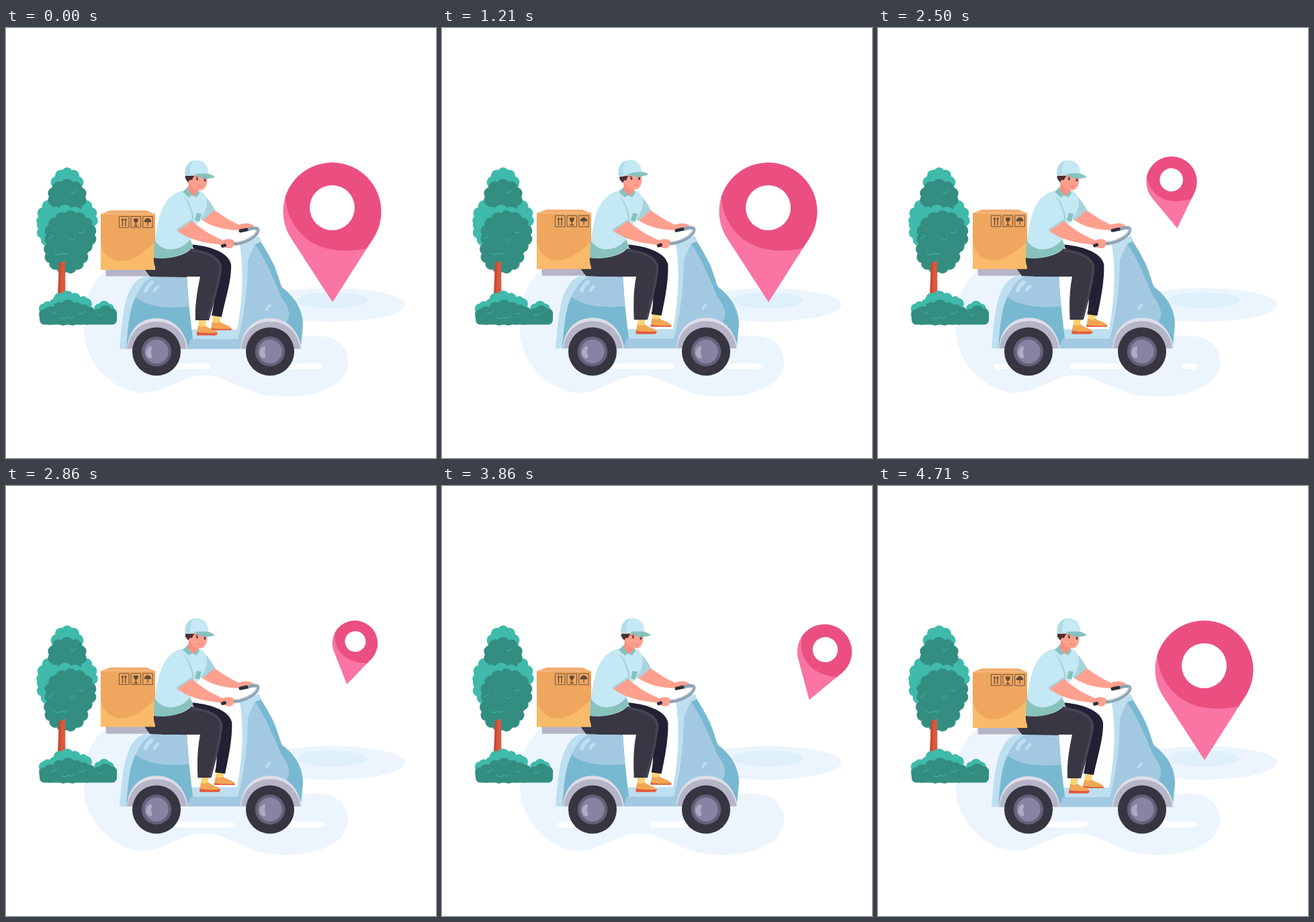
An HTML page that plays this animation: 640 by 640 pixels, repeating every 4.78 s.

```html
<!DOCTYPE html>
<html lang="en">
<head>
<meta charset="utf-8">
<title>Scooter delivery</title>
<style>
  html, body { margin: 0; width: 100%; height: 100%; overflow: hidden; background: #fff; }
  svg { display: block; width: 100%; height: 100%; }
  .road { animation: road 4780ms linear infinite; }
  @keyframes road { from { stroke-dashoffset: 127.5; } to { stroke-dashoffset: 628.5; } }
  .lt { fill: #40baaa; } .dk { fill: #338e81; }
  .vein { fill: none; stroke: #40baaa; stroke-width: 1; stroke-linecap: round; }
  .pale { fill: #bddff0; } .mid { fill: #a3c9e2; } .deep { fill: #79b8d1; }
  .gleam { fill: none; stroke: #bddff0; stroke-linecap: round; }
  .skin { fill: #ffa08f; } .shirt { fill: #c4e8f4; } .teal { fill: #87c2bd; }
  .ink { fill: #383743; }
  .icon { fill: none; stroke: #5f4b3c; stroke-width: .9; }
</style>
</head>
<body>
<svg viewBox="0 0 640 640">
  <defs>
    <g id="wheel">
      <circle r="36" fill="#363541"/>
      <circle r="22.3" fill="#656179"/>
      <circle r="17.8" fill="#8883a2"/>
      <path d="M-11 -7C-7 -10 -6 -5 -8 -1C-9 3 -4 8 -8 10C-14 11 -20 0 -11 -7Z" fill="#aeabc4"/>
    </g>
    <g id="fender">
      <path d="M-44 -4C-43 -30 -26 -49.500 0 -49.500C27 -49.500 43 -30 47 -4Z" fill="#dedee9"/>
      <path d="M-43 -4C-41 -28 -24 -44.500 0 -44.500C25 -44.500 42 -28 45 -4Z" fill="#b6b5c7"/>
    </g>
  </defs>

  <path fill="#ecf5fe" d="M116 452C114 405 128 366 160 357L200 362C240 380 240 470 300 470C360 474 420 458 460 458C488 457 509 471 509 497C508 532 465 549 415 549C350 548 335 516 292 517C258 518 240 543 202 543C160 541 118 500 116 452Z"/>
  <path class="road" d="M177.500 503.500H470.700" fill="none" stroke="#fff" stroke-width="8.500" stroke-linecap="round" stroke-dasharray="83.500 83.500"/>
  <ellipse cx="484" cy="412" rx="110" ry="25" fill="#ecf5fe"/>
  <ellipse cx="485" cy="405.500" rx="53" ry="12" fill="#dff0fb"/>

  <g id="tree">
    <path class="lt" data-puff="91 236 25 29"/>
    <path class="lt" data-puff="91 284 46 37"/>
    <path class="dk" data-puff="91 251 30 26"/>
    <path class="lt" data-puff="88 299 43 35"/>
    <path class="dk" data-puff="96 308 39 36"/>
    <path class="dk" data-puff="90 332 34 34"/>
    <path class="vein" d="M63 313q5 1 6-5M72 335q5 5 11 0q5 4 10-1M95 315q5 3 8-3M108 304q5 3 9-2M96 244q5 3 8-2"/>
    <path fill="#dc583d" d="M79 350L88 346.500L88.500 402H77Z"/>
    <path fill="#c64a35" d="M79 350L82 349L81 402H77Z"/>
    <path class="lt" data-puff="62 422 15 17"/>
    <path class="lt" data-puff="91 416 28 25"/>
    <path class="lt" data-puff="115 419 15 22"/>
    <path class="lt" data-puff="146 422 17 17"/>
    <path class="dk" data-puff="66 428 19 14"/>
    <path class="dk" data-puff="92 424 28 19"/>
    <path class="dk" data-puff="116 427 20 16"/>
    <path class="dk" data-puff="148 427 20 14"/>
    <rect class="dk" x="50" y="426" width="115" height="15.500" rx="7"/>
    <path class="vein" d="M67 425q6 1 8-4M82 431q6 4 10-1q5 4 10-1M109 425q5 2 9-3M137 427q5 2 8-2"/>
  </g>

  <g id="pin">
    <path fill="#fa74a4" d="M486 408L424 312.500A73 73 0 1 1 547 312.500Z"/>
    <path fill="#ea4f80" d="M415.500 252C420 302 460 344 537 328L547 312.500A73 73 0 1 0 415.500 252Z"/>
    <circle cx="485.500" cy="267.500" r="33.500" fill="#fff"/>
  </g>

  <g id="bike">
    <path fill="#b6b5c8" d="M148 356H212V369.500H149Z"/>
    <path class="pale" d="M169 477.500C173 430 176 404 187 386C193 375 202 370 210 370H269L272 410L275 449H344C351 410 355 365 348 322L377 311L380 319L400 353L410 386C428 398 442 418 442 442L438 477.500Z"/>
    <path class="deep" d="M179 477.500C182 440 184 415 195 397C203 380 214 370 226 370H269L272 410L278 463V477.500Z"/>
    <path class="mid" d="M193 401C201 382 212 370 226 370H269L272 415C235 418 210 414 193 401Z"/>
    <path class="mid" d="M275 463H345C356 425 360 375 360 345L371 321L412 387C429 400 440 420 438 445L436 477.500H270Z"/>
    <path class="deep" d="M371 322L379 318C394 340 405 366 410 386C428 398 442 418 442 442L439 474L436 468C434 456 428 446 417 439C427 425 417 410 410 401C399 376 387 345 371 322Z"/>
    <path class="pale" d="M347 321L376 310L380 318L352 328Z"/>
    <path class="gleam" stroke-width="6" d="M208 391Q210 384 217 379"/>
    <path class="gleam" stroke-width="4.500" d="M221 391Q222 388 226 385"/>
    <path class="gleam" stroke-width="3.500" d="M388 419Q389 415 393 413"/>
    <use href="#fender" x="224" y="481.500"/>
    <use href="#fender" x="393" y="481.500"/>
    <path class="ink" d="M205 357L224 352L269 361V371L214 370Z"/>
  </g>
  <use href="#wheel" x="224" y="481.500"/>
  <use href="#wheel" x="393" y="481.500"/>

  <g id="box">
    <path fill="#f3ab70" d="M141 277L155 271.500H209L222 277Z"/>
    <path fill="#f9ba69" d="M141 276.500H222V360H141Z"/>
    <path fill="#efa65f" d="M141 276.500H222V319C205 334 190 347 170 347C155 346 145 336 141 322Z"/>
    <path d="M141 276.700H222" stroke="#f8c493" stroke-width="1"/>
    <g class="icon">
      <path d="M168.500 280.500h14.500v16.500h-14.500zM186 280.500h14.500v16.500h-14.500zM203.800 280.500h14.500v16.500h-14.500z"/>
      <path stroke-width="1.300" d="M173.500 295v-10M178 295v-10M193.200 289v5.500M190.500 294.500h5.500M211 289v5"/>
      <path fill="#5f4b3c" d="M172 286l1.500-2.500 1.500 2.500zM176.500 286l1.500-2.500 1.500 2.500zM190.300 284h6q0 5.500-3 5.500t-3-5.500zM206 288.500q1-5 5-5t5 5z"/>
    </g>
  </g>

  <g id="farFoot">
    <path fill="#f8d36f" d="M308 429H319L318 441H307Z"/>
    <path fill="#f2a654" d="M305 447L307 437Q313 441 318 437C324 442 335 442 336 449H305Z"/>
    <path fill="#e2583f" d="M305 446.500Q318 449 336 447.500L335.500 449.700H305Z"/>
  </g>
  <path id="farLeg" fill="#232034"/>
  <g id="nearFoot">
    <path fill="#f8d36f" d="M287 433H298L296 447H286Z"/>
    <path fill="#f2a654" d="M284 454L286 443Q292 447 297 443C303 449 315 449 315 455H284Z"/>
    <path fill="#e2583f" d="M284 452.500Q297 455 315 453.500Q315 457.500 310 457.500H284Z"/>
  </g>
  <path id="nearLeg" class="ink"/>
  <path id="crease" fill="none" stroke="#464554" stroke-width="3.500"/>

  <path class="skin" d="M291 285L309 270C322 280 336 288 347 293C354 289 366 291 368 294C369 297 362 297 362 300L350 301C328 301 307 297 291 285Z"/>
  <path fill="#a9d3dc" d="M288 246C300 250 306 262 311 271L292 287L282 275Z"/>
  <path class="shirt" d="M265 242C250 244 239 254 232 270C224 290 221 318 220 341C242 345 268 337 278 325C272 316 277 302 284 292C291 283 297 276 299 262C299 249 294 243 286 242Z"/>
  <path class="teal" d="M220 342C242 346 268 338 278.500 325L274 315C260 332 234 336 221.200 316Z"/>
  <path fill="#a9d3dc" d="M264 250C272 256 277 269 280 283L278 288C276 272 270 259 264 250Z"/>
  <path class="teal" d="M284 275L291 276.500L288 288L281 286.500Z"/>
  <path fill="#a9d3dc" d="M253 300L277 284L280 290L258 305Z"/>
  <path class="skin" d="M255 302L277 287C289 299 307 309 323 316C329 313 339 314 340 318C341 323 338 327 333 328C326 328 322 324 316 322C294 320 270 314 255 302Z"/>
  <g id="bars" fill="none" stroke-linecap="round">
    <path stroke="#8fa3b2" stroke-width="5" d="M341 321.500C358 319 374 310 375 301C375 297 368 297 360 300"/>
    <path stroke="#b9cbd8" stroke-width="1.500" d="M345 319C362 315 373 307 374 300"/>
    <path stroke="#302e3b" stroke-width="5" d="M322.500 324.500L325.500 323.500M349 302L358 300"/>
  </g>
  <path class="teal" d="M263 244L271 236L285 238L288 246L283 252L277 249L272 252Z"/>

  <g id="head">
    <path fill="#f98f80" d="M272 230H285L286 243L278 250L271 241Z"/>
    <path class="skin" d="M274 218H299C300.500 228 299 240 290 241.500C280 242 274 235 274 228Z"/>
    <path fill="#4a3033" d="M267 220H281C278 222 278 225 276 228L272 230C269 227 266 225 267 220Z"/>
    <circle class="skin" cx="275" cy="229" r="3"/>
    <path fill="none" stroke="#4a3033" stroke-width="1" d="M282 222.500L286 222M294 224L298 224.500"/>
    <circle cx="284.500" cy="225" r="1.500" fill="#332a38"/>
    <circle cx="296" cy="227" r="1.500" fill="#332a38"/>
    <path fill="none" stroke="#e56f68" stroke-width="1" d="M286 235Q290 237.500 293 235"/>
    <path class="shirt" d="M267 220C265 205 273 197 284 197C296 197 301 205 301.500 218C290 221 278 218 267 220Z"/>
    <path fill="#aedde7" d="M267 220C265 207 271 199 280 197C274 204 273 211 274.500 219Z"/>
    <path class="teal" d="M280 217C291 217 302 214 311 222C301 226 287 225 280 217Z"/>
  </g>
</svg>
<script>
const LOOP = 4780, TAU = 2 * Math.PI;
const $ = id => document.getElementById(id);

// Scalloped oval: notches on an inner ellipse, joined by arcs bulging outwards.
function puff(cx, cy, rx, ry) {
  const n = Math.round(Math.PI * (rx + ry) / 17);
  const notch = i => {
    const a = TAU * (i + .5) / n - TAU / 4;
    return [cx + (rx - 3) * Math.cos(a), cy + (ry - 3) * Math.sin(a)];
  };
  let d = `M${notch(0)}`;
  for (let i = 1; i <= n; i++) {
    const p = notch(i - 1), q = notch(i);
    const r = .6 * Math.hypot(q[0] - p[0], q[1] - p[1]);
    d += `A${r} ${r} 0 0 1 ${q}`;
  }
  return d + 'Z';
}
for (const el of document.querySelectorAll('[data-puff]')) {
  el.setAttribute('d', puff(...el.dataset.puff.split(' ').map(Number)));
}

// Key poses of the pin: time, x, y, scale, tilt.
const flight = [
  [1300, 485.5, 267.5, 1, 0],
  [1860, 418.5, 222, .667, -12],
  [2500, 436.5, 226, .516, -6.7],
  [3210, 594.5, 237, .444, 27],
  [3860, 570.5, 243.5, .557, 17.9],
  [4320, 485.5, 267.5, 1, 0]
];

// Smooth curve through the keys, at rest at both ends.
function sample(keys, time) {
  const last = keys.length - 1;
  const t = Math.min(Math.max(time, keys[0][0]), keys[last][0]);
  const i = Math.min(keys.findLastIndex(k => k[0] <= t), last - 1);
  const a = keys[i], b = keys[i + 1], h = b[0] - a[0], u = (t - a[0]) / h;
  const slope = (n, c) => n === 0 || n === last ? 0
    : (keys[n + 1][c] - keys[n - 1][c]) / (keys[n + 1][0] - keys[n - 1][0]);
  return [1, 2, 3, 4].map(c => a[c] + (b[c] - a[c]) * u * u * (3 - 2 * u)
    + h * u * (1 - u) * ((1 - u) * slope(i, c) - u * slope(i + 1, c)));
}

const move = (id, value) => $(id).setAttribute('transform', value);
const shape = (id, d) => $(id).setAttribute('d', d);
const clamp = v => Math.min(Math.max(v, 0), 1);

function pose(t) {
  const [x, y, s, tilt] = sample(flight, t);
  move('pin', `translate(${x} ${y}) rotate(${tilt}) scale(${s}) translate(-485.5 -267.5)`);

  // The ride sways in place and comes to rest at the seam of the loop.
  const sway = Math.cos(TAU * t / 1330);
  const power = clamp(3 * Math.sin(Math.PI * t / LOOP) - .15);
  const lift = power * (2.1 - sway), foot = power * (3 + 2 * sway);
  const look = Math.sin(Math.PI * clamp((t - 300) / 2400)) ** 2;

  move('head', `rotate(${-9 * look} 277 243)`);
  move('box', `translate(0 ${-lift})`);
  const bob = `translate(0 ${-lift * .5})`;
  move('bike', bob);
  move('bars', bob);

  const near = foot * .8, far = foot * 1.2, knee = foot * .3;
  move('nearFoot', `translate(${foot} ${-foot * .35 - lift * .3})`);
  move('farFoot', `translate(${far} ${-foot - lift * .3})`);
  shape('farLeg', `M273 322C302 324 ${331 + knee} 333 ${335 + knee} 352C${336 + knee} 375 ${326 + far} 405 ${321 + far} ${430 - foot * .4}L${306 + far} ${428 - foot * .4}C${311 + far} 405 313 380 312 358Z`);
  shape('nearLeg', `M220 342C245 344 266 339 276 328C302 332 ${320 + knee} 340 ${321 + knee} 356C${321 + knee} 374 ${308 + near} 410 ${302 + near} ${435 - lift * .5}H${282 + near}C${281 + near} 410 285 390 289 370L232 370C224 363 219 352 220 342Z`);
  shape('crease', `M276 331C301 334 ${317 + knee} 342 ${319 + knee} 356C${319 + knee} 373 ${307 + near} 410 ${301 + near} ${433 - lift * .5}`);
}

function tick(now) {
  pose(now % LOOP);
  requestAnimationFrame(tick);
}
pose(0);
requestAnimationFrame(tick);
</script>
</body>
</html>
```
